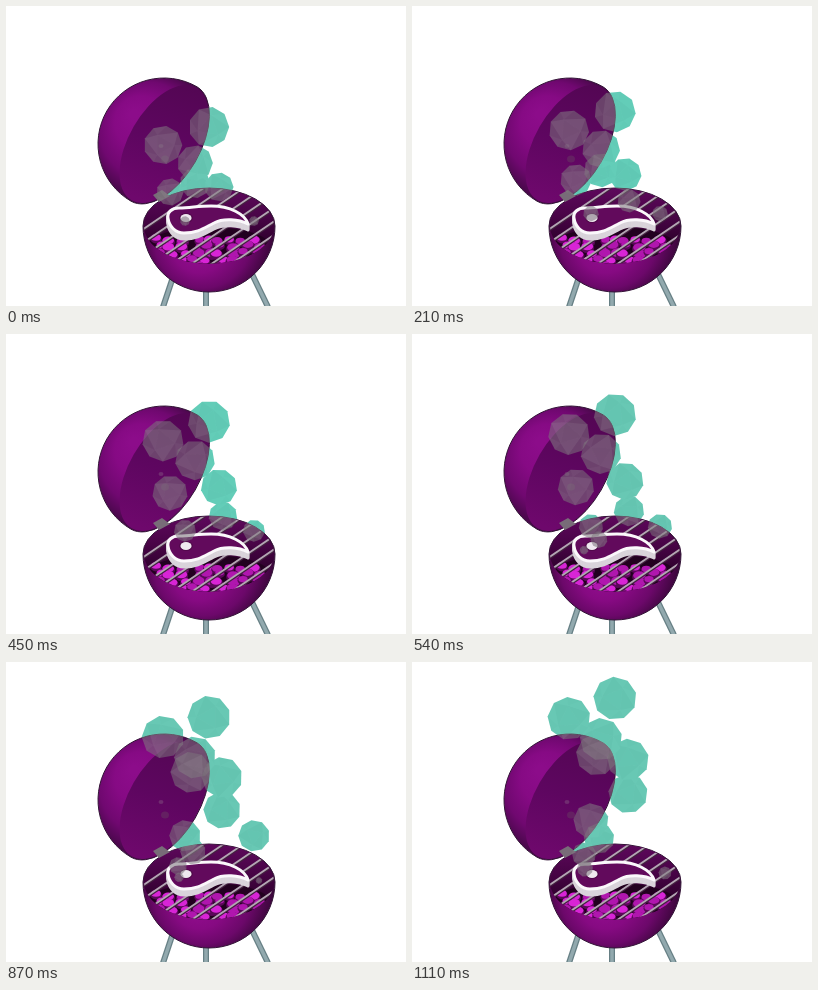
Animation of 400x300 px, one loop 1.17 s. Source, as an HTML page with a canvas:

```html
<!DOCTYPE html>
<html lang="en">
<head>
<meta charset="utf-8">
<title>Grill</title>
<style>
html, body { margin: 0; width: 100%; height: 100%; overflow: hidden; background: #fff; }
canvas { display: block; width: 400px; height: 300px; }
</style>
</head>
<body>
<canvas id="stage" width="400" height="300"></canvas>
<script>
const ctx = document.getElementById('stage').getContext('2d');
const LOOP = 1170, STEP = 30, LAST = 37, DEG = Math.PI / 180;

// Smoke leaves the coals slowly and gathers speed; its size follows its height.
const COALS_Y = 225, SPEED = 88, LAG = 1.6;
const rise = age => SPEED * (Math.hypot(age, LAG) - LAG);
const ageAt = height => Math.sqrt((height / SPEED + LAG) ** 2 - LAG ** 2);
const sizeAt = height => 21 * (1 - Math.exp(-height / 40));

// A puff is at (x, y) when it first shows, and lasts until `to`.
const puff = (x, y, from = 0, to = LOOP) => ({ x, from, to, age: ageAt(COALS_Y - y) });
const puffs = [
  puff(157, 139),
  puff(203, 121),
  puff(189, 157),
  puff(164, 186, 0, 570),
  puff(213, 181, 0, 570),
  puff(248, 215, 0, 960),
  puff(179, 215),
  puff(189, 177, 0, 270),
  puff(217, 202, 60, 570),
  puff(187, 208, 480),
  puff(172, 217, 510),
  puff(173, 222, 600),
  puff(216, 122, 780),
  puff(216, 154, 780),
  puff(185, 117, 780),
  puff(253, 220, 810)
];

function rng(seed) {
  return () => (seed = (seed * 16807) % 2147483647) / 2147483647;
}

function line(g, x1, y1, x2, y2, width, color) {
  g.beginPath();
  g.moveTo(x1, y1);
  g.lineTo(x2, y2);
  g.lineWidth = width;
  g.strokeStyle = color;
  g.stroke();
}

function blob(g, x, y, rx, ry, color) {
  g.beginPath();
  g.ellipse(x, y, rx, ry, 0, 0, 7);
  g.fillStyle = color;
  g.fill();
}

function ramp(gradient, ...stops) {
  stops.forEach((c, i) => gradient.addColorStop(i / (stops.length - 1), c));
  return gradient;
}

function drawLegs(g) {
  const leg = (...ends) => {
    line(g, ...ends, 6, '#667f84');
    line(g, ...ends, 3.5, '#92a9ae');
  };
  leg(168, 268, 157, 301);
  leg(200, 280, 200, 301);
  leg(245, 266, 262, 301);
}

function drawLid(g) {
  g.beginPath();
  g.arc(158, 138, 66, -60 * DEG, 120 * DEG, true);
  g.ellipse(158, 138, 66, 36, -60 * DEG, Math.PI, 0, true);
  g.closePath();
  g.fillStyle = ramp(g.createRadialGradient(128, 108, 4, 148, 132, 70),
    '#8c0c8a', '#860a84', '#700870', '#3c083e');
  g.fill();
  g.lineWidth = 1;
  g.strokeStyle = '#321436';
  g.stroke();

  g.beginPath();
  g.ellipse(158, 138, 65, 35, -60 * DEG, 0, 7);
  g.fillStyle = ramp(g.createLinearGradient(180, 80, 140, 195), '#540654', '#5e0660', '#6e086c');
  g.fill();
  blob(g, 155, 140, 2.5, 2, '#702c70');
  blob(g, 159, 153, 4, 3.5, '#642062');
}

// Round embers, each lit from above and dark below.
function drawCoals(g) {
  const rand = rng(77);
  blob(g, 203, 241, 62, 20, '#22001f');
  for (let y = 231; y < 260; y += 7) {
    for (let x = 150; x < 258; x += 12) {
      const cx = x + rand() * 8, cy = y + rand() * 4, r = 4 + rand() * 2;
      blob(g, cx, cy + 1.5, r * 1.3, r, '#5a0858');
      blob(g, cx, cy, r * 1.1, r * 0.75, rand() < 0.5 ? '#d824d6' : '#b016ae');
    }
  }
}

function drawBowl(g) {
  g.beginPath();
  g.arc(203, 220, 66, 0, Math.PI);
  g.ellipse(203, 220, 66, 38, 0, Math.PI, 2 * Math.PI);
  g.fillStyle = ramp(g.createRadialGradient(190, 246, 6, 200, 227, 70),
    '#900c8c', '#860a82', '#6c086a', '#360636');
  g.fill();
  g.lineWidth = 1;
  g.strokeStyle = '#321436';
  g.stroke();

  g.save();
  g.beginPath();
  g.ellipse(203, 220, 65, 37.5, 0, 0, 7);
  g.clip();
  g.fillStyle = ramp(g.createLinearGradient(0, 182, 0, 240), '#5e085c', '#480446', '#2a0028');
  g.fillRect(130, 180, 145, 80);
  drawCoals(g);
  for (let c = 178; c < 275; c += 13.5) {
    line(g, 133, c + 49, 273, c - 46, 2.6, '#43203f');
    line(g, 133, c + 48, 273, c - 47, 1.8, '#b4a6b4');
  }
  g.restore();
}

function drawHinge(g) {
  g.fillStyle = '#786c78';
  g.fill(new Path2D('M147 189L156 184L164 190L153 196Z'));
}

function drawSteak(g) {
  const top = new Path2D('M162 212C161 206 166 202 173 202C184 202 192 200 205 200' +
    'C224 200 239 208 242 218C233 213 217 212 208 217C198 222 192 227 178 227C169 227 163 220 162 212Z');
  g.lineJoin = 'round';
  for (let d = 6; d >= 0; d--) {
    g.save();
    g.translate(0, d);
    g.lineWidth = 3;
    g.strokeStyle = d ? '#d9d3da' : '#fbf8fb';
    g.fillStyle = d ? '#e4dfe5' : '#620a5c';
    g.fill(top);
    g.stroke(top);
    g.restore();
  }
  blob(g, 180, 212, 6.8, 4.8, '#4d0847');
  blob(g, 180, 212, 5.6, 4, '#efe8ef');
}

const grill = document.createElement('canvas');
grill.width = 400;
grill.height = 300;
const gg = grill.getContext('2d');
[drawLegs, drawLid, drawBowl, drawHinge, drawSteak].forEach(draw => draw(gg));

// A faceted ball: a rounded outline of nine corners around one front triangle.
function ball(x, y, r, turn) {
  const ring = (count, k) => Array.from({ length: count }, (_, i) => {
    const a = turn + i * 2 * Math.PI / count;
    return [x + r * k * Math.cos(a), y + r * k * Math.sin(a)];
  });
  return { outline: ring(9, 1.04), front: ring(3, 0.62) };
}

function poly(points, color) {
  ctx.beginPath();
  points.forEach(p => ctx.lineTo(...p));
  ctx.closePath();
  ctx.fillStyle = color;
  ctx.fill();
}

function facets({ outline, front }, tone) {
  poly(front, `rgba(${tone},.10)`);
  for (let i = 0; i < 3; i++) {
    poly([front[i], outline[3 * i], outline[3 * i + 1]], `rgba(${tone},.06)`);
    poly([front[i], front[(i + 1) % 3], outline[3 * i + 2]], `rgba(${tone},.12)`);
  }
}

function render(t) {
  const glow = Math.max(0, 1 - Math.abs(t - 330) / 150);
  const teal = `rgb(${104 - 26 * glow},${200 + 24 * glow},${180 + 22 * glow})`;
  const balls = [];
  puffs.forEach(({ x, from, to, age }, i) => {
    if (t < from || t >= to) return;
    const height = rise(age + (t - from) / 1000);
    balls.push(ball(x, COALS_Y - height, sizeAt(height), i * 0.7 + t * 0.0004));
  });

  ctx.globalCompositeOperation = 'source-over';
  ctx.clearRect(0, 0, 400, 300);
  ctx.drawImage(grill, 0, 0);

  // Grey haze over the grill, solid teal where nothing lies behind.
  ctx.globalCompositeOperation = 'source-atop';
  balls.forEach(b => {
    poly(b.outline, 'rgba(122,114,122,.55)');
    facets(b, '180,172,180');
  });
  ctx.globalCompositeOperation = 'destination-over';
  balls.forEach(b => {
    facets(b, '70,165,148');
    poly(b.outline, teal);
  });
}

const start = performance.now();
function tick() {
  const t = (performance.now() - start) % LOOP;
  render(Math.min(LAST, Math.floor(t / STEP)) * STEP);
  requestAnimationFrame(tick);
}
tick();
</script>
</body>
</html>
```
